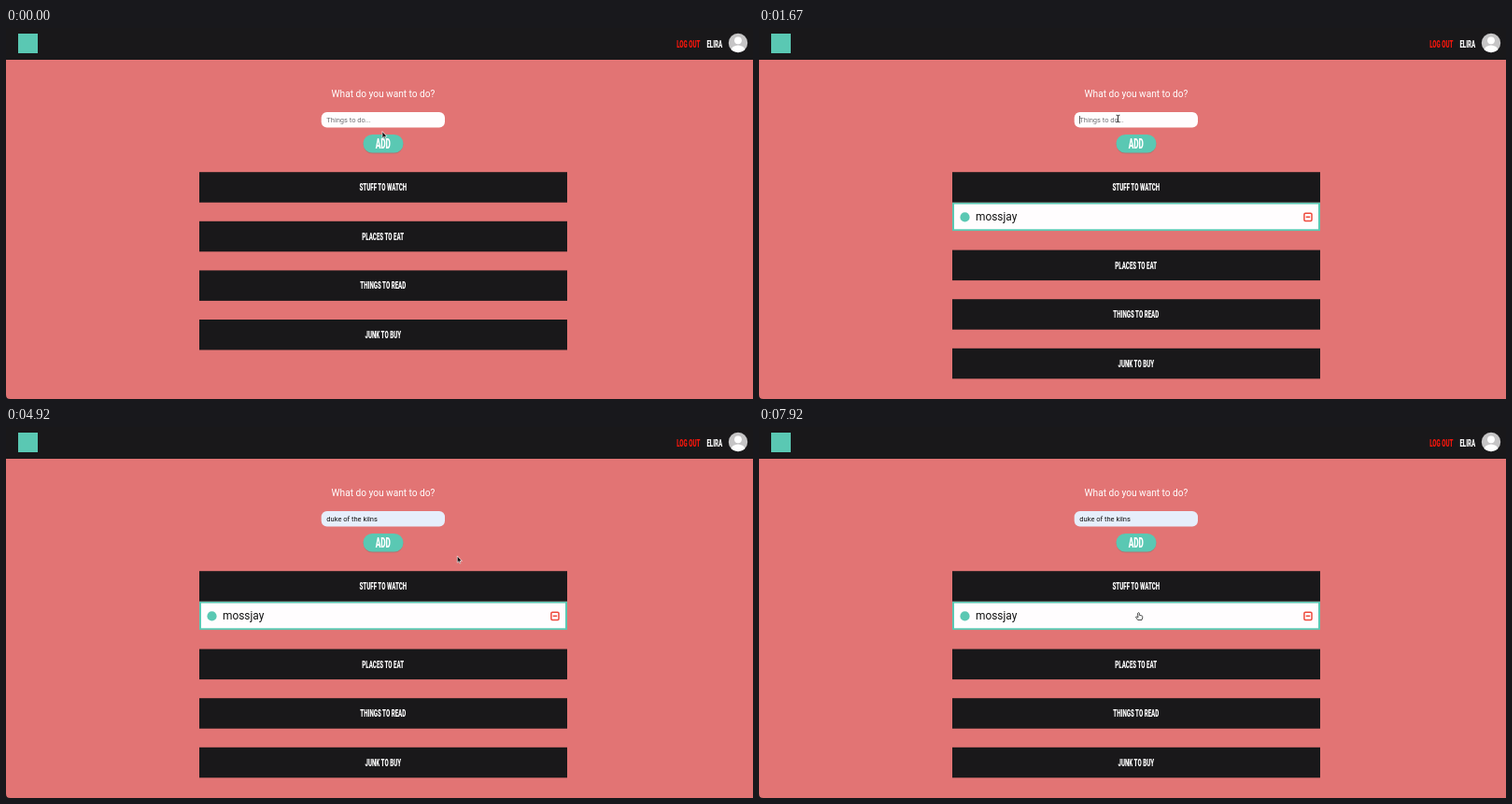
Write an HTML page that moves like this. It is 800 px wide and 397 px high and loops after 8000 ms.

```html
<!DOCTYPE html>
<html lang="en">
<head>
<meta charset="utf-8">
<title>Smart list</title>
<style>
  html, body { margin: 0; width: 100%; height: 100%; overflow: hidden; background: #e27474; }
  #stage { display: block; width: 800px; height: 397px; font-family: Roboto, sans-serif; }
  .caps { font-weight: 800; font-size: 11.2px; fill: #fff; }
  .menu { font: 600 5.5px Inter, sans-serif; fill: #f4f4f5; }
  .field { font-size: 7.5px; }
  .preview { font: 500 5.1px Inter, sans-serif; }
</style>
</head>
<body>
<svg id="stage" viewBox="0 0 800 397">
  <rect width="800" height="397" fill="#e27474"/>
  <path d="M0 392.500Q0 397 4.500 397H0Z" fill="#1a1a1c"/>
  <rect width="800" height="34" fill="#19181a"/>
  <rect x="13" y="6" width="21" height="21" fill="#5ac8b3"/>
  <g id="nav"></g>
  <clipPath id="round"><circle cx="784" cy="16" r="10.200"/></clipPath>
  <g clip-path="url(#round)">
    <rect x="773" y="5" width="22" height="22" fill="#c6c5c6"/>
    <circle cx="784" cy="13.300" r="3.900" fill="#fff"/>
    <ellipse cx="784" cy="24" rx="7.400" ry="5.600" fill="#fff"/>
  </g>

  <text x="404" y="73.500" text-anchor="middle" font-size="10.150" fill="#fff">What do you want to do?</text>
  <rect id="input" x="337.700" y="90" width="132.300" height="16.500" rx="6"/>
  <text id="value" x="343.300" y="101"></text>
  <rect id="caret" x="343.300" y="94" width=".7" height="8.500" fill="#222"/>

  <rect x="382.500" y="114.600" width="43" height="20" rx="10" fill="#9b6f6b" opacity=".6"/>
  <rect x="382.500" y="114" width="43" height="19.600" rx="9.800" fill="#5ac8b3"/>
  <g id="add"></g>

  <g id="rows"></g>
  <svg id="panel" x="207" y="186.500" width="394" height="0">
    <rect id="frame" x="1" y="1" width="392" fill="#fffdfe" stroke="#5ac8b3" stroke-width="2"/>
    <circle cx="13.500" cy="15.900" r="5.100" fill="#5ac8b3"/>
    <text x="25" y="19.700" font-size="11.900" fill="#111">mossjay</text>
    <g fill="none" stroke="#ee4a3c" stroke-width="1.500">
      <rect x="376.900" y="11.800" width="8.100" height="8.100" rx="1.200"/>
      <path d="M378.700 15.850h4.500"/>
    </g>
  </svg>

  <g id="menu">
    <rect x="337.700" y="107" width="132.300" height="97.800" rx="1.500" fill="#201f23"/>
    <rect id="hover" x="337.700" width="132.300" height="15.150" fill="#39383a"/>
    <g id="items"></g>
  </g>

  <g id="cursor" stroke-linejoin="round" stroke-linecap="round">
    <path id="arrow" d="M0 0V6.800L1.600 5.400L2.600 7.700L3.700 7.200L2.700 5H4.700Z" fill="#111" stroke="#fff" stroke-width=".6"/>
    <path id="hand" d="M-.8 .6Q0 -.6 .8 .6V2.800L3.700 3.500Q4.500 3.900 4.300 4.800L3.500 8H-.8L-3 4.900Q-2.700 3.700 -.8 5Z" fill="#fff" stroke="#222" stroke-width=".8"/>
    <path id="beam" d="M-1.500 -3.800Q0 -3.800 0 -2.800Q0 -3.800 1.500 -3.800M0 -2.800V2.800M-1.500 3.800Q0 3.800 0 2.800Q0 3.800 1.500 3.800" fill="none" stroke="#222" stroke-width=".9"/>
  </g>
</svg>
<script>
const LOOP = 8000, FOCUS = 1600, MENU_OPEN = 2080, PICK = 4350;
const PANEL_START = 550, PANEL_TIME = 560, PANEL_HEIGHT = 30.8;
const ITEM_TOP = 110.2, ITEM_HEIGHT = 15.15;
const ideas = ["to paint a cloudgoose", "eat molly fenrip", "duke of the kilns",
               "quon lamthieu", "cream baron", "eggs"];
const lists = ["STUFF TO WATCH", "PLACES TO EAT", "THINGS TO READ", "JUNK TO BUY"];
// time, x, y of the pointer
const path = [
  [80, 403, 111], [550, 400.5, 160], [900, 400.5, 160], [1500, 384.5, 97],
  [2150, 384.5, 97], [2600, 380.5, 126], [3400, 380.5, 127], [3750, 374, 148],
  [4600, 374, 148], [5080, 521, 135], [6450, 521, 135], [6830, 489, 140],
  [6960, 489, 140], [7500, 396, 226], [7620, 396, 226], [7900, 406.5, 198.5]
];

const $ = id => document.getElementById(id);
const show = (id, on) => $(id).setAttribute("display", on ? "inline" : "none");
const smooth = u => { u = Math.min(1, Math.max(0, u)); return u * u * (3 - 2 * u); };

// One condensed style for every capital label.
const caps = (text, x, y, extra = "") =>
  `<text class="caps" text-anchor="middle" transform="translate(${x} ${y}) scale(.55 1)" ${extra}>${text}</text>`;

$("nav").innerHTML = caps("LOG OUT", 730.8, 21, 'style="fill:#f5160c"') + caps("ELIRA", 758.8, 21);
$("add").innerHTML = caps("ADD", 403.8, 129, 'style="font-size:15px"');
$("rows").innerHTML = lists.map((name, i) =>
  `<g><rect x="207" y="${154.2 + 52.6 * i}" width="394" height="32.500" fill="#19181a"/>${caps(name, 403.8, 174.2 + 52.6 * i)}</g>`).join("");
$("items").innerHTML = ideas.map((idea, i) =>
  `<text class="menu" x="343" y="${120 + ITEM_HEIGHT * i}">${idea}</text>`).join("");
const rows = [...$("rows").children];

function pointer(t) {
  const next = path.findIndex(p => p[0] > t);
  if (next === 0) return path[0].slice(1);
  if (next < 0) return path.at(-1).slice(1);
  const [t0, x0, y0] = path[next - 1], [t1, x1, y1] = path[next];
  const u = smooth((t - t0) / (t1 - t0));
  return [x0 + (x1 - x0) * u, y0 + (y1 - y0) * u];
}

function drawPanel(t) {
  const height = PANEL_HEIGHT * smooth((t - PANEL_START) / PANEL_TIME);
  rows.forEach((row, i) => row.setAttribute("transform", `translate(0 ${i ? height : 0})`));
  show("panel", height > 0);
  $("panel").setAttribute("height", height);
  $("frame").setAttribute("height", Math.max(0, height - 2));
  return height;
}

function drawInput(t, y) {
  const open = t >= MENU_OPEN && t < PICK, picked = t >= PICK;
  const index = Math.floor((y - ITEM_TOP) / ITEM_HEIGHT);
  const preview = open && index >= 0;
  show("menu", open);
  show("hover", preview);
  if (preview) $("hover").setAttribute("y", ITEM_TOP + index * ITEM_HEIGHT);
  const value = $("value");
  value.textContent = picked ? ideas[2] : preview ? ideas[index] : "Things to do...";
  value.setAttribute("class", preview ? "preview" : "field");
  value.setAttribute("fill", picked || preview ? "#111" : "#707074");
  $("input").setAttribute("fill", picked || preview ? "#e6eefb" : "#fffdfe");
  show("caret", t >= FOCUS && !picked && (t - FOCUS) % 1000 < 500);
  return open;
}

function drawCursor(x, y, open, height) {
  const inside = (left, right, top, bottom) => x > left && x < right && y > top && y < bottom;
  const beam = inside(338, 470, 90, 106.5);
  const hand = !open && (inside(383, 425, 114, 134) || inside(207, 601, 154, 186.5 + height));
  $("cursor").setAttribute("transform", `translate(${x} ${y})`);
  show("beam", beam);
  show("hand", hand);
  show("arrow", !beam && !hand);
}

function draw(now) {
  const t = now % LOOP, [x, y] = pointer(t);
  const height = drawPanel(t), open = drawInput(t, y);
  drawCursor(x, y, open, height);
  requestAnimationFrame(draw);
}
draw(0);
</script>
</body>
</html>
```
